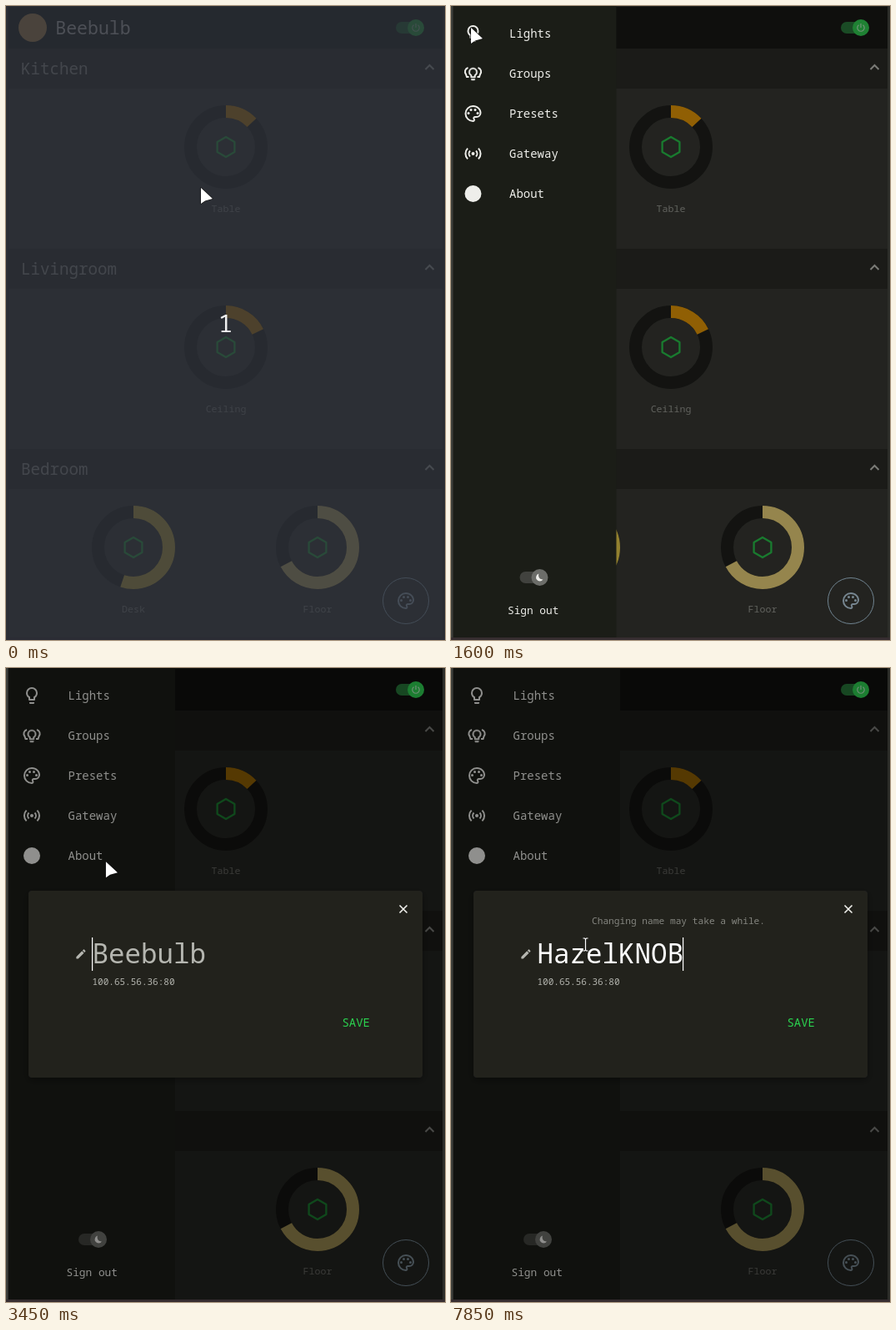
Write an HTML page that moves like this. It is 527 px wide and 760 px high and loops after 8 s.

```html
<!DOCTYPE html>
<html lang="en">
<head>
<meta charset="utf-8">
<title>Smart light panel</title>
<style>
  html, body { margin: 0; width: 100%; height: 100%; overflow: hidden; background: #2c2d29; }
  svg { display: block; width: 527px; height: 760px; font-family: "Noto Sans Mono", monospace; }
  text { white-space: pre; }
  .line { fill: none; stroke-width: 2; }
</style>
</head>
<body>
<svg viewBox="0 0 527 760">
  <defs>
    <clipPath id="page"><rect x="3" width="521" height="757"/></clipPath>
    <filter id="shadow" x="-10%" y="-10%" width="120%" height="125%">
      <feDropShadow dx="0" dy="3" stdDeviation="4" flood-opacity=".35"/>
    </filter>
    <path id="bulb" d="M12 2A7 7 0 0 1 19 9C19 11.4 17.8 13.5 16 14.7V17A1 1 0 0 1 15 18H9A1 1 0 0 1 8 17V14.7C6.2 13.5 5 11.4 5 9A7 7 0 0 1 12 2M9 21V20H15V21A1 1 0 0 1 14 22H10A1 1 0 0 1 9 21M12 4A5 5 0 0 0 7 9C7 11 8.2 12.8 10 13.6V16H14V13.6C15.8 12.8 17 11 17 9A5 5 0 0 0 12 4Z"/>
    <g id="bulbs">
      <use href="#bulb" transform="translate(3 3.500) scale(.75)" stroke="currentColor" stroke-width=".6"/>
      <path class="line" stroke="currentColor" d="M6 5A5 5 0 0 0 3.500 13L4.500 16H7M18 5A5 5 0 0 1 20.500 13L19.500 16H17"/>
    </g>
    <g id="palette">
      <path d="M12 22A10 10 0 0 1 2 12A10 10 0 0 1 12 2C17.5 2 22 6 22 11A6 6 0 0 1 16 17H14.2C13.9 17 13.7 17.2 13.7 17.5L13.8 17.8C14.2 18.3 14.4 18.9 14.4 19.5C14.5 20.9 13.4 22 12 22M12 4A8 8 0 0 0 12 20C12.3 20 12.5 19.8 12.5 19.5L12.4 19.1C12 18.6 11.8 18.1 11.8 17.5C11.8 16.1 12.9 15 14.3 15H16A4 4 0 0 0 20 11C20 7.1 16.4 4 12 4Z"/>
      <circle cx="6.5" cy="11.5" r="1.5"/><circle cx="9.5" cy="7.5" r="1.5"/>
      <circle cx="14.5" cy="7.5" r="1.5"/><circle cx="17.5" cy="11.5" r="1.5"/>
    </g>
    <g id="signal">
      <circle cx="12" cy="12" r="2"/>
      <path class="line" stroke="currentColor" d="M8.5 8.5A5 5 0 0 0 8.5 15.5M15.5 8.5A5 5 0 0 1 15.5 15.5M5.6 5.6A9 9 0 0 0 5.6 18.4M18.4 5.6A9 9 0 0 1 18.4 18.4"/>
    </g>
    <circle id="disc" cx="12" cy="12" r="10"/>
    <path id="pencil" d="M20.7 7C21.1 6.6 21.1 6 20.7 5.6L18.4 3.3C18 2.9 17.3 2.9 17 3.3L15.1 5.1L18.9 8.9M3 17.2V21H6.8L17.8 9.9L14 6.2Z"/>
  </defs>

  <rect width="527" height="760" fill="#2c2d29"/>
  <rect width="2" height="760" fill="#3c3e39"/>
  <rect y="757" width="527" height="3" fill="#362d30"/>

  <g clip-path="url(#page)">
    <rect x="3" width="521" height="757" fill="#3b3c37"/>
    <rect x="3" y="1" width="521" height="50" fill="#191a16"/>
    <circle cx="32" cy="26" r="17" fill="#e2ac5c"/>
    <text x="59.3" y="34" font-size="21.5" fill="#f2f2ee">Beebulb</text>
    <g id="rooms"></g>
    <circle cx="480" cy="713" r="27.5" fill="none" stroke="#bfe0f5"/>
    <use href="#palette" x="468" y="701" fill="#c9e4f5"/>

    <rect id="drawerShade" x="3" width="521" height="757"/>
    <g id="drawer" fill="#eeeeea" color="#eeeeea">
      <rect x="3" width="200" height="757" fill="#1b1d17"/>
      <rect id="rowGlow" x="3" y="153" width="200" height="48" fill="#fff"/>
      <g id="menu"></g>
      <rect x="87" y="678" width="30" height="14" rx="7" fill="#41423e"/>
      <circle cx="111" cy="685" r="10" fill="#6c6d69"/>
      <path d="M110 680.5A4.6 4.6 0 1 0 115 687.5A5 5 0 0 1 110 680.5Z"/>
      <text x="72.5" y="729" font-size="12.8">Sign out</text>
    </g>
    <rect id="dialogShade" x="3" width="521" height="757"/>
    <g id="powerSwitch">
      <rect x="468" y="19" width="32" height="14" rx="7" fill="#227536"/>
      <circle cx="492" cy="26" r="10" fill="#2bd14f"/>
      <path fill="none" stroke="#b9efc5" stroke-width="1.2" d="M492 21V26M489.5 22.7A4.2 4.2 0 1 0 494.5 22.7"/>
    </g>

    <g id="dialog">
      <rect x="27" y="267" width="473" height="224" rx="4" fill="#23241f" filter="url(#shadow)"/>
      <path fill="none" stroke="#f0f0ec" stroke-width="1.6" d="M472.5 284.5L481.5 293.5M481.5 284.5L472.5 293.5"/>
      <text id="message" x="273" y="307" font-size="11.2" text-anchor="middle" fill="#858680">Changing name may take a while.</text>
      <use href="#pencil" transform="translate(82.5 335.5) scale(.62)" fill="#b5b6b0"/>
      <text id="name" x="103.5" y="354" font-size="32.5"></text>
      <rect id="caret" y="323" width="1.2" height="40" fill="#fff"/>
      <text x="103.5" y="380" font-size="11" fill="#b5b6b0">100.65.56.36:80</text>
      <text x="403.5" y="430" font-size="13.9" fill="#2bd14f">SAVE</text>
    </g>
  </g>

  <g id="countdown">
    <rect width="527" height="760" fill="#292c35" opacity=".82"/>
    <text x="263.5" y="391" font-size="29" text-anchor="middle" fill="#f0f0f0">1</text>
  </g>
  <path id="arrow" d="M0 0V19L5 15.5L14 13Z" fill="#fff" stroke="#111" stroke-width="1.2" stroke-linejoin="round" paint-order="stroke"/>
  <path id="beam" fill="none" stroke="#fff" stroke-width="1.2" d="M-3 -7.5H-1L0 -6.5L1 -7.5H3M0 -6.5V6.5M-3 7.5H-1L0 6.5L1 7.5H3"/>
</svg>
<script>
const LOOP = 8000, PLACEHOLDER = 'Beebulb', TYPED = 'HazelKNOB';
const DRAWER_DIM = .42, DIALOG_DIM = .4;
const el = id => document.getElementById(id);
const set = (id, attrs) => {
  for (const key in attrs) el(id).setAttribute(key, attrs[key]);
};

// Static parts built from short descriptions
const hexagon = (x, y) => Array.from({ length: 6 }, (_, i) => {
  const a = i * Math.PI / 3;
  return `${x + 12 * Math.sin(a)},${y - 12 * Math.cos(a)}`;
}).join(' ');

const lamp = (x, y, level, color, label) => `
  <g fill="none" stroke-width="15">
    <circle cx="${x}" cy="${y}" r="42.5" stroke="#20211d"/>
    <circle cx="${x}" cy="${y}" r="42.5" stroke="${color}" pathLength="100"
      stroke-dasharray="${level} 100" transform="rotate(-90 ${x} ${y})"/>
    <polygon points="${hexagon(x, y)}" stroke="#2bd14f" stroke-width="2.3" stroke-linejoin="round"/>
  </g>
  <text x="${x}" y="${y + 78}" font-size="11.6" text-anchor="middle" fill="#a5a69f">${label}</text>`;

const room = (y, title, ...lamps) => `
  <rect x="3" y="${y}" width="521" height="48" fill="#2d2e29"/>
  <text x="18" y="${y + 31}" font-size="19.2" fill="#bcbdb6">${title}</text>
  <path class="line" stroke="#d0d1ca" d="M503.5 ${y + 25}l5 -5l5 5"/>
  ${lamps.map(([x, ...rest]) => lamp(x, y + 118, ...rest)).join('')}`;

el('rooms').innerHTML =
  room(51, 'Kitchen', [264, 13, '#f4a106', 'Table']) +
  room(291, 'Livingroom', [264, 17.8, '#f4a106', 'Ceiling']) +
  room(531, 'Bedroom', [153, 55.1, '#fadb4f', 'Desk'], [374, 67.3, '#fce283', 'Floor']);

el('menu').innerHTML = [
  ['bulb', 'Lights'], ['bulbs', 'Groups'], ['palette', 'Presets'], ['signal', 'Gateway'], ['disc', 'About'],
].map(([icon, label], i) => `
  <use href="#${icon}" x="19" y="${21 + 48 * i}"/>
  <text x="74.5" y="${38 + 48 * i}" font-size="14">${label}</text>`).join('');

// Timing
const progress = (t, start, end) => Math.min(1, Math.max(0, (t - start) / (end - start)));
const bezier = (x1, y1, x2, y2) => x => {
  const curve = (a, b, s) => 3 * a * s * (1 - s) ** 2 + 3 * b * s * s * (1 - s) + s ** 3;
  let low = 0, high = 1;
  for (let i = 0; i < 24; i++) {
    const mid = (low + high) / 2;
    if (curve(x1, x2, mid) < x) low = mid; else high = mid;
  }
  return curve(y1, y2, high);
};
const standard = bezier(.4, 0, .2, 1);
const swift = bezier(.25, .8, .25, 1);
const smooth = bezier(.42, 0, .58, 1);

// start, end, x, y of each pointer move
const moves = [
  [300, 1100, 31, 24], [1150, 1400, 24, 26], [2000, 2600, 110, 176], [3000, 3100, 99, 179],
  [3250, 3750, 161.5, 338], [3850, 4150, 161.5, 335], [4400, 4650, 161.5, 331.5],
];
const keyTimes = [5500, 5800, 6150, 6300, 6500, 7200, 7700, 7700, 7850];
const caretOff = [[3850, 4650], [5350, 5500], [7100, 7200]];

function pointer(t) {
  let x = 234, y = 218;
  for (const [start, end, toX, toY] of moves) {
    const p = smooth(progress(t, start, end));
    x += (toX - x) * p;
    y += (toY - y) * p;
  }
  return [x, y];
}

function render(t) {
  set('countdown', { opacity: 1 - progress(t, 300, 500) });

  const open = standard(progress(t, 1500, 1625));
  set('drawer', { transform: `translate(${-200 * (1 - open)})` });
  set('drawerShade', { opacity: DRAWER_DIM * open });
  set('powerSwitch', { opacity: 1 - DRAWER_DIM * open });
  set('rowGlow', { opacity: .04 * progress(t, 2950, 3050) * (1 - progress(t, 3250, 3450)) });

  const shown = swift(progress(t, 3110, 3410));
  set('dialogShade', { opacity: DIALOG_DIM * shown });
  set('dialog', {
    opacity: shown,
    transform: `translate(263.5 379) scale(${.5 + shown / 2}) translate(-263.5 -379)`,
  });
  set('message', { opacity: progress(t, 3850, 4200) });

  const count = keyTimes.filter(time => t >= time).length;
  el('name').textContent = count ? TYPED.slice(0, count) : PLACEHOLDER;
  set('name', { fill: count ? '#fff' : '#b5b6b0' });
  set('caret', {
    x: 103 + 19.5 * count - (count ? .5 : 0),
    opacity: caretOff.some(([from, to]) => t >= from && t < to) ? 0 : 1,
  });

  const [x, y] = pointer(t);
  const overInput = t > 3250 && y > 323;
  set('arrow', { transform: `translate(${x} ${y})`, opacity: overInput ? 0 : 1 });
  set('beam', { transform: `translate(${x} ${y})`, opacity: overInput ? 1 : 0 });
}

const began = performance.now();
function tick() {
  render((performance.now() - began) % LOOP);
  requestAnimationFrame(tick);
}
tick();
</script>
</body>
</html>
```
